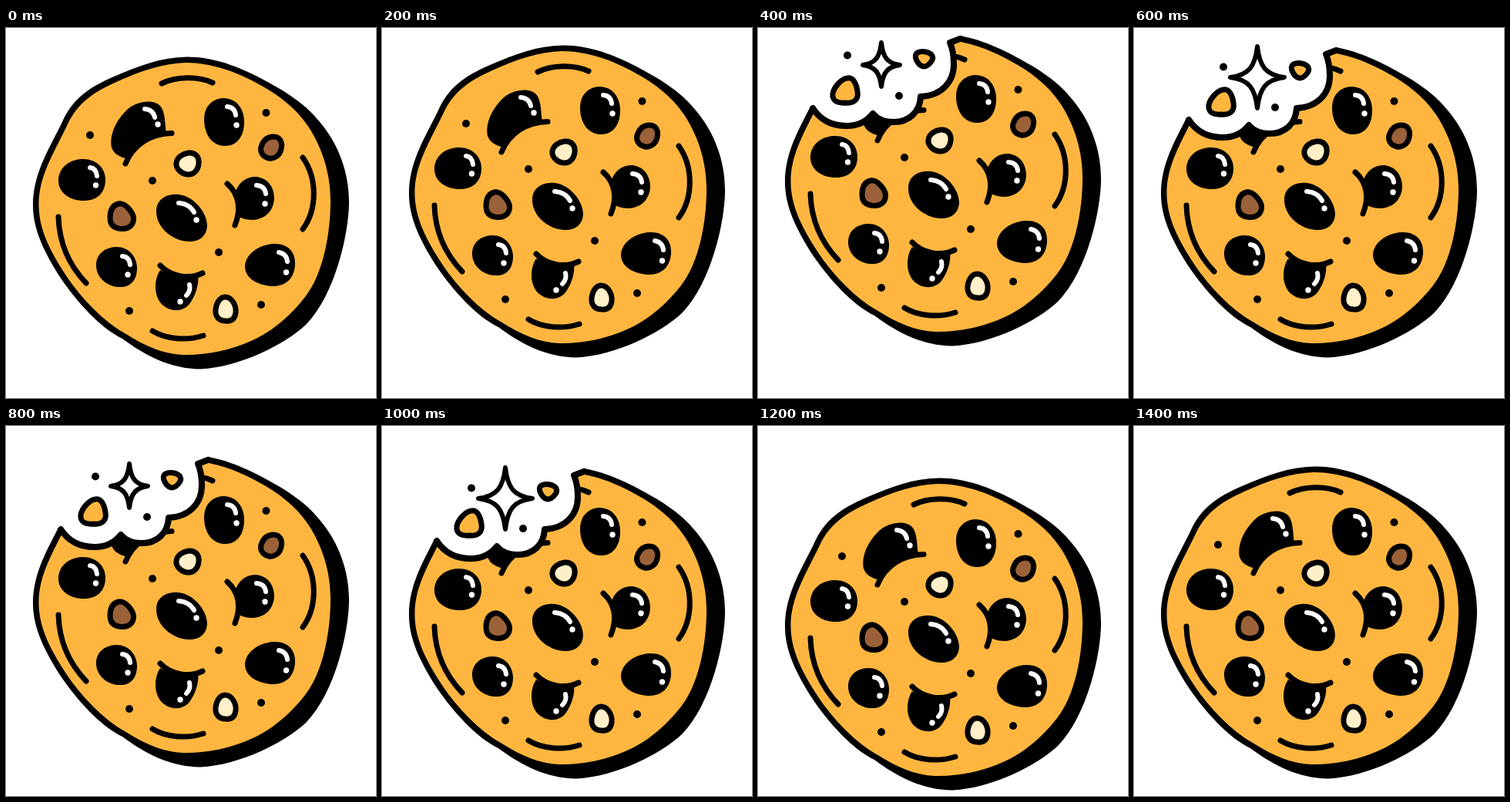
Animation, 480 px wide and 480 px high, one loop 1600 ms. Source, as an HTML page:

```html
<!DOCTYPE html>
<html lang="en">
<head>
<meta charset="utf-8">
<title>Cookie</title>
<style>
  html, body { margin: 0; width: 100%; height: 100%; overflow: hidden; background: #fff; }
  svg { display: block; width: 100%; height: 100%; }
  .cookie, .bite, .small, .large { animation: 1.6s step-end infinite; }
  .cookie { animation-name: bob; }
  .bite { animation-name: bite; }
  .small { animation-name: twinkle; animation-duration: .4s; }
  .large { animation-name: twinkle; animation-duration: .4s; animation-delay: -.2s; }
  .line { fill: none; stroke: #000; stroke-width: 7; stroke-linecap: round; stroke-linejoin: round; }
  .edge { stroke-width: 8; }
  .shine { fill: none; stroke: #fff; stroke-width: 6; stroke-linecap: round; }
  .spark { fill: #fff; stroke: #000; stroke-width: 6; stroke-linejoin: round; }
  .dough { fill: #ffb640; }
  .brown { fill: #9b6138; }
  .cream { fill: #fff0c9; }
  .white { fill: #fff; }

  @keyframes bob {
    0%, 50%, 100% { transform: translateY(0); }
    12.5%, 37.5% { transform: translateY(-15px); }
    25% { transform: translateY(-30px); }
    62.5%, 87.5% { transform: translateY(15px); }
    75% { transform: translateY(30px); }
  }
  @keyframes bite {
    0%, 75%, 100% { opacity: 0; }
    25% { opacity: 1; }
  }
  @keyframes twinkle {
    0% { opacity: 1; }
    50%, 100% { opacity: 0; }
  }
</style>
</head>
<body>
<svg viewBox="0 0 480 480">
  <g class="cookie">
    <!-- silhouette with shadow, then the face -->
    <path d="M234 37.500C268 37 302 50 332 66C356 79 386 95 408 123C432 152 445 188 445 226C445 264 428 345 389 385C362 410 304 440 252 442.500C214 442 182 426 151 403C122 389 92 355 72 326C50 292 35 262 35 230C35 190 54 160 72 124C86 92 106 78 140 63C172 49 202 38 234 37.500Z"/>
    <path class="dough" d="M234 45C266 45 300 57 328 73C352 86 376 103 393 129C411 157 421 190 421 224C421 268 411 320 388 349C371 371 347 393 320 405C292 418 261 424.500 230 424C204 423 181 413 154 396C127 381 98 351 78.500 322C57 289 42.500 261 42.500 229C42.500 193 61 164 79 127C92 98 112 84 143 70C174 56 204 45.500 234 45Z"/>

    <g class="line">
      <path d="M202 72C220 63 249 62 268 71"/>
      <path d="M385 168C404 195 404 235 385 261"/>
      <path d="M68 245C69 280 82 308 104 331"/>
      <path d="M190 393C208 404 235 406 256 399"/>
      <path d="M155 176C165 151 188 137 215 136.500"/>
      <path d="M287 202C303 216 305 236 297 256"/>
      <path d="M200 308C213 322 237 327 255 318"/>
    </g>

    <!-- chocolate chips -->
    <path d="M157 170C148 167 140 164 137 155C133 135 148 112 162 102C175 94 192 93 200 101C207 109 206 125 208 137C186 141 166 152 157 170Z"/>
    <path d="M282 91C299 91 309 105 309 122C309 140 300 153 284 153C266 153 257 136 257 119C257 103 266 92 282 91Z"/>
    <path d="M98 170C115 169 129 180 129 197C129 214 118 224 101 224C83 224 68 214 68 198C68 183 80 171 98 170Z"/>
    <path d="M217 216C238 213 261 236 261 257C260 273 246 280 229 276C209 271 195 255 195 238C195 225 204 217 217 216Z"/>
    <path d="M142 284C158 283 170 296 170 311C170 328 161 337 146 336C130 335 117 323 117 308C117 294 127 285 142 284Z"/>
    <path d="M347 280C365 279 376 290 375 307C374 324 364 335 346 335C327 334 310 325 310 309C311 293 328 281 347 280Z"/>
    <path d="M298 212C302 200 312 193 324 193C339 194 348 206 348 221C347 238 336 248 320 249C311 249 304 246 298 243C303 233 302 222 298 212Z"/>
    <path d="M200 314C215 323 234 325 249 320C251 333 245 349 238 358C230 368 215 369 204 360C192 350 191 328 200 314Z"/>

    <g class="shine">
      <path d="M180 105Q191 106 193 116"/>
      <path d="M287 102Q297 103 298 113"/>
      <path d="M109 181Q117 182 118 192"/>
      <path d="M224 227Q238 228 244 239"/>
      <path d="M151 296Q160 297 161 307"/>
      <path d="M354 291Q364 293 365 303"/>
      <path d="M325 204Q336 205 337 215"/>
      <path d="M238 333Q240 341 234 347"/>
    </g>
    <g class="white">
      <circle cx="197" cy="125" r="3.7"/>
      <circle cx="299" cy="126" r="3.7"/>
      <circle cx="116.500" cy="204" r="3.7"/>
      <circle cx="247" cy="249" r="3.7"/>
      <circle cx="158" cy="320" r="3.7"/>
      <circle cx="363.500" cy="317" r="3.7"/>
      <circle cx="336" cy="228" r="3.7"/>
      <circle cx="226" cy="355" r="3.7"/>
    </g>

    <!-- nuts -->
    <g class="line">
      <path class="brown" d="M347 141C356 141 359 149 357 157C355 166 348 170 341 169C333 167 329 161 331 154C334 145 340 141 347 141Z"/>
      <path class="brown" d="M146 228C154 226 164 238 165.500 246C166 256 159 261 150 260.500C140 260 135 255 135 246C135 237 138 230 146 228Z"/>
      <path class="cream" d="M237 162C246 161 251 168 250 176C249 185 243 191 235 190C227 189 220 182 221 175C222 167 230 163 237 162Z"/>
      <path class="cream" d="M284 349C293 349 299 360 298 369C297 377 293 381 285 380C276 380 271 374 272 365C273 356 278 349 284 349Z"/>
    </g>

    <circle cx="109" cy="139" r="5"/>
    <circle cx="337.500" cy="110" r="5"/>
    <circle cx="190" cy="198" r="5"/>
    <circle cx="276" cy="291" r="5"/>
    <circle cx="331" cy="359" r="5"/>
    <circle cx="160" cy="367" r="5"/>

    <g class="bite">
      <path class="white" d="M71 134C80 148 95 157 115 157C131 157 142 150 149 141C155 148 165 152 176 152C196 152 210 139 211 119C238 118 254 100 254 77C254 65 252 56 249 49L262 44L258 25H30V132H58Z"/>
      <path class="line edge" d="M71 134C80 148 95 157 115 157C131 157 142 150 149 141C155 148 165 152 176 152C196 152 210 139 211 119C238 118 254 100 254 77C254 65 252 56 249 49L262 44"/>
      <g class="line">
        <path class="dough" d="M116 95C124 93 128 104 129 112C131 123 124 128 114 127C102 128 96 124 97 115C99 106 108 96 116 95Z"/>
        <path class="dough" d="M207 62C213 59 223 61 226 66C229 72 220 80 215 80C208 79 200 66 207 62Z"/>
      </g>
      <circle cx="116" cy="65.500" r="5"/>
      <circle cx="183" cy="118" r="5"/>
      <g class="spark">
        <path class="small" transform="translate(160 78)" d="M0 -29C2 -10 8 -2 24 0C8 2 2 10 0 28C-2 10 -8 2 -24 0C-8 -2 -2 -10 0 -29Z"/>
        <path class="large" transform="translate(160 79)" d="M0 -40C3 -14 11 -3 35 0C11 3 3 14 0 40C-3 14 -11 3 -35 0C-11 -3 -3 -14 0 -40Z"/>
      </g>
    </g>
  </g>
</svg>
</body>
</html>
```
